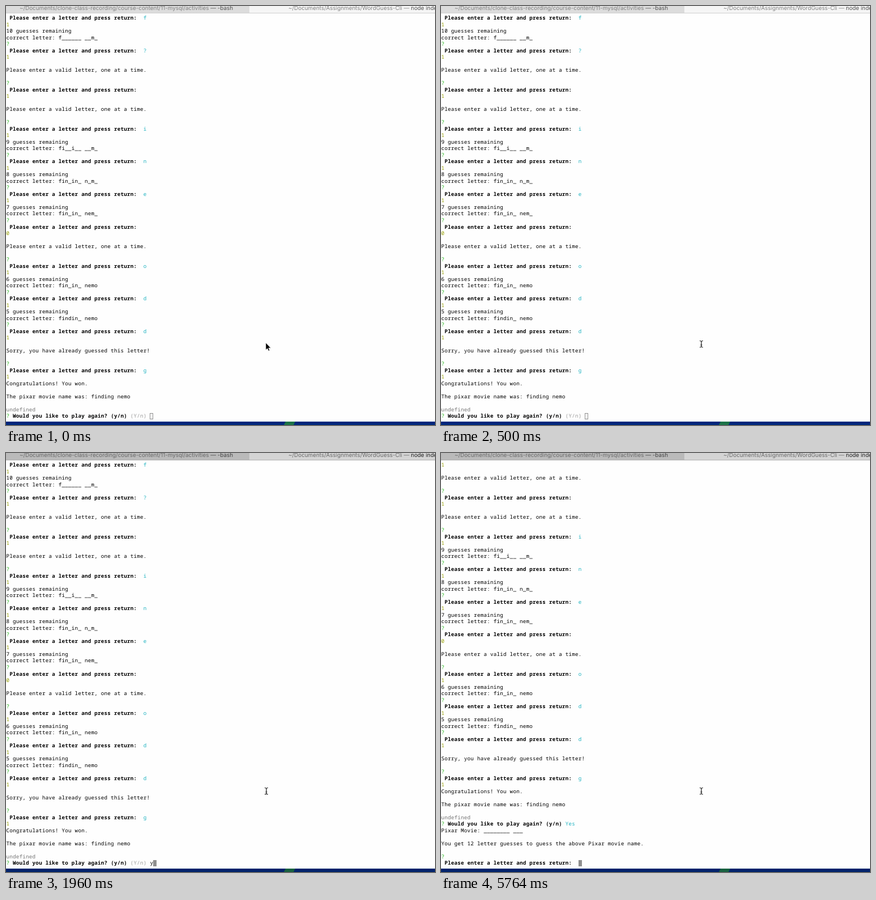
Recreate the animation shown at these times as an HTML page. Size 758 by 739 pixels, loop 8 s.

```html
<!DOCTYPE html>
<html lang="en">
<head>
<meta charset="utf-8">
<title>Word guess in a terminal</title>
<style>
  html, body { margin: 0; width: 100%; height: 100%; overflow: hidden; background: #fff; }
  #stage { position: relative; width: 758px; height: 739px; overflow: hidden; background: #fefefe; }
  .tab {
    position: absolute; top: 0; height: 13px; box-sizing: border-box; overflow: hidden;
    border-bottom: 1px solid #cfcfcf;
    font: 9.88px/12px Inter, "Liberation Sans", sans-serif;
    text-rendering: geometricPrecision; white-space: pre; color: #808080;
  }
  .tab span { position: absolute; top: -1.6px; }
  .tab b { font-weight: 400; color: #505050; }
  #left { left: 0; width: 430px; background: #dcdcdc; }
  #left span { left: 0; width: 425px; text-align: center; }
  #right { left: 430px; width: 328px; background: #f5f5f5; }
  #right span { left: 69px; }
  .active .tab { color: #6a6a6a; border-color: #b0b0b0; }
  .active #left { background: #bababa; }
  .active #right { background: #d4d4d4; }
  .active #left b { color: #444; }
  .active #right b { color: #222; }
  #log {
    position: absolute; left: .4px; top: 15px; margin: 0; color: #000;
    font: 500 9.2px/11.52px "Noto Sans Mono", "DejaVu Sans Mono", monospace;
    letter-spacing: .26px; text-rendering: geometricPrecision;
  }
  #log b { font-weight: 700; }
  #log i { font-style: normal; }
  .g { color: #1fb414; }
  .o { color: #98a006; }
  .c { color: #1fb2c0; }
  .d { color: #757575; }
  .h { color: #9a9a9a; }
  #caret {
    position: absolute; top: 718px; width: 6px; height: 11px;
    box-sizing: border-box; border: 1px solid #8f8f8f;
  }
  .active #caret { background: #8f8f8f; }
  svg { position: absolute; left: 0; top: 0; }
  .desk { fill: #00277c; }
  .leaf { fill: #1d7348; }
  .active .desk { fill: #00226b; }
  .active .leaf { fill: #17603f; }
</style>
</head>
<body>
<div id="stage">
  <div class="tab" id="left"><span>~/Documents/clone-class-recording/course-content/11-mysql/activities <b>— -bash</b></span></div>
  <div class="tab" id="right"><span>~/Documents/Assignments/WordGuess-Cli — <b>node index.js</b></span></div>
  <pre id="log"></pre>
  <div id="caret"></div>
  <svg width="758" height="739">
    <path class="desk" d="M0 733H758V739H0z"/>
    <path class="leaf" d="M494 733H511L508 739H491z"/>
    <path id="arrow" d="M459 594v12.6l2.9-2.7 1.9 4.4 2-.9-1.9-4.2h3.9z" stroke="#fff" stroke-width=".6"/>
    <path id="beam" d="M457 590.5q2.5 0 3 1.4q.5-1.4 3-1.4M460 591.5v9.5M457 602q2.5 0 3-1.4q.5 1.4 3 1.4M458.5 598h3" fill="none" stroke="#111" stroke-width="1.2"/>
  </svg>
</div>
<script>
const $ = id => document.getElementById(id);
const tint = (cls, text) => `<i class="${cls}">${text}</i>`;

const ask = (letter = '') =>
  ` <b>Please enter a letter and press return:</b>  ${tint('c', letter)}`;
const turn = (letter, lines, count = 1) =>
  [tint('g', '?'), ask(letter), tint('o', count), ...lines];
const guess = (letter, left, word) =>
  turn(letter, [`${left} guesses remaining`, `correct letter: ${word}`]);
const note = (letter, text, count) => turn(letter, ['', text, ''], count);

const invalid = 'Please enter a valid letter, one at a time.';
const again = `${tint('g', '?')} <b>Would you like to play again? (y/n)</b> `;

const history = [
  ...guess('f', 10, 'f______ __m_').slice(1),
  ...note('?', invalid),
  ...note('', invalid),
  ...guess('i', 9, 'fi__i__ __m_'),
  ...guess('n', 8, 'fin_in_ n_m_'),
  ...guess('e', 7, 'fin_in_ nem_'),
  ...note('', invalid, 0),
  ...guess('o', 6, 'fin_in_ nemo'),
  ...guess('d', 5, 'findin_ nemo'),
  ...note('d', 'Sorry, you have already guessed this letter!'),
  ...turn('g', ['Congratulations! You won.', '',
    'The pixar movie name was: finding nemo', '', tint('d', 'undefined')])
];

const waiting = [...history, again + tint('h', '(Y/n)')];
const typed = [...history, again + tint('h', '(Y/n)') + ' y'];
const restarted = [...history, again + tint('c', 'Yes'),
  'Pixar Movie: ________ ___', '',
  'You get 12 letter guesses to guess the above Pixar movie name.', '',
  tint('g', '?'), ask()];

const ROWS = 62, LOOP = 8000;
const steps = [
  { at: 0, log: waiting, caret: 254, arrow: true },
  { at: 500, log: waiting, caret: 254 },
  { at: 620, log: waiting, caret: 254, active: true },
  { at: 1960, log: typed, caret: 260, active: true },
  { at: 2410, log: restarted, caret: 243, active: true }
];

let shown;
function show(step) {
  $('log').innerHTML = step.log.slice(-ROWS).join('\n');
  $('caret').style.left = step.caret + 'px';
  $('stage').classList.toggle('active', !!step.active);
  $('arrow').style.display = step.arrow ? '' : 'none';
  $('beam').style.display = step.arrow ? 'none' : '';
}

const start = performance.now();
function tick() {
  const t = (performance.now() - start) % LOOP;
  const step = steps.filter(s => s.at <= t).pop();
  if (step !== shown) show(shown = step);
  requestAnimationFrame(tick);
}
tick();
</script>
</body>
</html>
```
